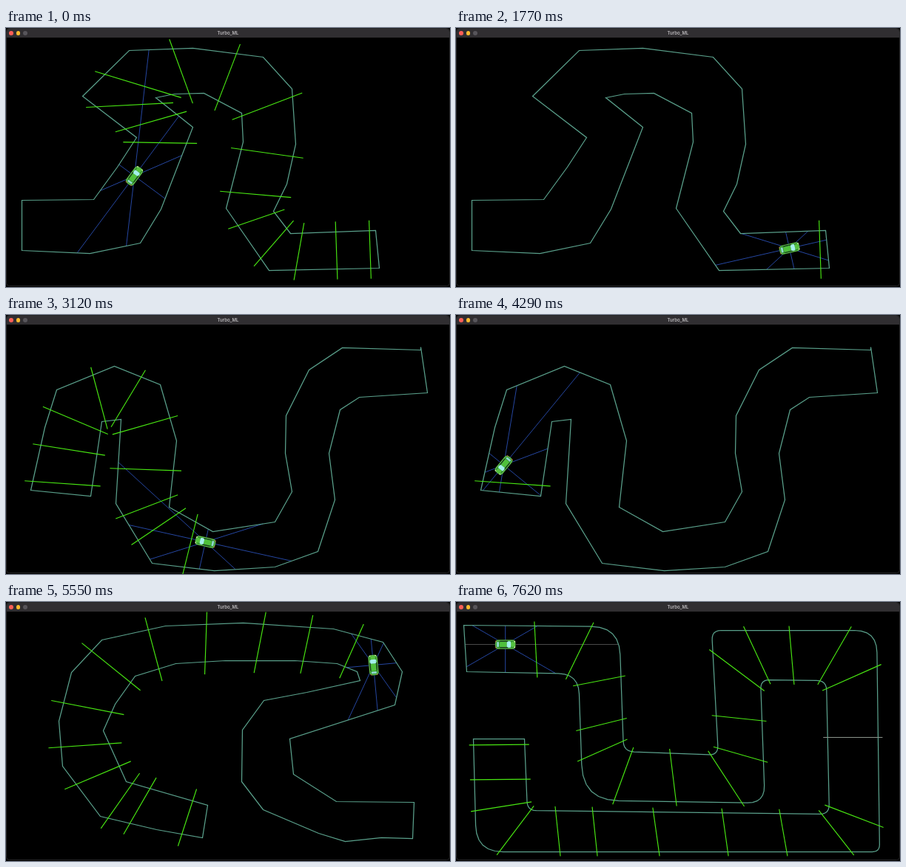
Animation, 600 px wide and 351 px high, one loop 7650 ms. Source, as an HTML page with a canvas:

```html
<!DOCTYPE html>
<html lang="en">
<head>
<meta charset="utf-8">
<title>Turbo_ML</title>
<style>
  html, body { margin: 0; width: 100%; height: 100%; overflow: hidden; background: #000; }
  #stage { position: relative; width: 600px; height: 351px; overflow: hidden; background: #000; }
  canvas { position: absolute; left: 0; top: 0; }
  #bar {
    position: absolute; left: 1px; top: 1px; width: 598px; height: 12px;
    border-radius: 4px 4px 0 0; background: #302e31; color: #b9b7ba;
    font: 600 6px/12px Inter, Roboto, sans-serif; text-align: center;
  }
  #bar i { position: absolute; top: 3.1px; width: 5.8px; height: 5.8px; border-radius: 50%; }
</style>
</head>
<body>
<div id="stage">
  <canvas id="view" width="600" height="351"></canvas>
  <div id="bar">
    <i style="left:3.1px;background:#ff5f57"></i>
    <i style="left:12.7px;background:#febc2e"></i>
    <i style="left:22.3px;background:#57555a"></i>
    Turbo_ML
  </div>
</div>
<script>
const LOOP = 7650, STEP = 30, NOSE = 11, SUB = 12, RAD = Math.PI / 180;
const RAYS = [0, 30, 90, 150, 180, 210, 270, 330];
const g = document.getElementById('view').getContext('2d');

// Walls: corners [x, y, rounding]. Routes: points [x, y, tilt of the gate there, if any].
const wallsA = [[21, 233], [118, 232], [150, 188], [176, 148], [103, 92], [166, 30], [252, 27],
  [347, 39], [386, 82], [391, 157], [379, 211], [361, 248], [384, 278], [499, 274], [504, 325],
  [355, 328], [297, 244], [320, 154], [318, 115], [267, 88], [227, 89], [202, 94], [252, 134],
  [209, 245], [181, 291], [113, 305], [21, 301]];
const routeA = [[152, 229], [173, 200], [206, 155, 1], [204, 124, -16], [165, 104, -3],
  [158, 70, 17], [236, 58, 70], [300, 63, 111], [354, 105, -21], [353, 169, 8], [337, 225, 5],
  [334, 260, -19], [360, 293, -49], [395, 305, -80], [446, 299, 88], [491, 286, 88]];

const wallsB = [[560, 47], [454, 44], [409, 74], [378, 136], [377, 187], [386, 239], [363, 280],
  [279, 293], [220, 260], [230, 170], [208, 94], [146, 69], [68, 101], [52, 152], [33, 237],
  [114, 245], [129, 144], [155, 141], [148, 255], [197, 336], [281, 346], [363, 341], [421, 320],
  [444, 250], [436, 187], [451, 128], [477, 111], [569, 105], [560, 43]];
const routeB = [[515, 76], [487, 78, 87], [459, 82, 64], [428, 109, 39], [408, 156, -4],
  [409, 214, 1], [410, 264, 24], [385, 302, 50], [326, 320, 84], [269, 307], [250, 304, 104],
  [200, 290, -34], [188, 260, -21], [189, 209, 2], [190, 148, -16], [167, 109, 121],
  [124, 107, 75], [90, 141, 23], [85, 182, 9], [64, 203], [50, 226, 4]];

const wallsC = [[551, 271], [446, 270], [388, 233], [383, 185], [525, 139], [535, 94], [509, 54],
  [442, 36], [320, 28], [215, 32], [129, 51], [88, 95], [71, 161], [76, 222], [127, 290],
  [203, 308], [265, 319], [272, 275], [162, 243], [131, 174], [147, 138], [174, 100], [229, 83],
  [296, 79], [390, 79], [447, 83], [474, 94], [478, 106], [406, 122], [348, 133], [319, 173],
  [318, 243], [347, 281], [422, 313], [458, 324], [507, 319], [549, 320]];
const routeC = [[515, 295], [482, 297, 87], [424, 290, 112], [368, 259, 142], [352, 221, -6],
  [351, 183, 7], [368, 158, 49], [415, 147, 78], [471, 131, 74], [498, 110, 5], [496, 85],
  [494, 64], [471, 56, 114], [406, 56, 102], [343, 53, 101], [270, 42, 92], [198, 60, 75],
  [140, 86, 39], [112, 143, 11], [104, 194, -4], [122, 235, -23], [156, 266, -55],
  [181, 275, -60], [245, 290, -72]];

const wallsD = [[10, 31], [220, 33, 38], [226, 202, 14], [354, 207, 13], [345, 38, 13],
  [568, 38, 30], [572, 338, 10], [27, 338, 36], [23, 185], [92, 185], [96, 282, 12],
  [504, 287, 13], [500, 106, 13], [411, 105, 12], [417, 272, 24], [171, 268, 48], [165, 97, 27],
  [14, 94]];
const routeD = [[64, 57], [107, 57, 87], [171, 57, 116], [195, 106, -11], [198, 165, -14],
  [196, 201, -24], [225, 236, 110], [293, 238, 83], [366, 241, 57], [383, 206, 16], [381, 157, 6],
  [379, 92, 37], [406, 71, 65], [453, 72, 85], [510, 74, 120], [534, 102, -24], [536, 183, 0],
  [538, 290, 21], [514, 313, 52], [442, 313, 80], [363, 311, 82], [270, 311, 82], [187, 310, 84],
  [137, 310, 84], [79, 310, -53], [60, 277, -9], [60, 240, -0.5], [58, 193, -0.5]];

const mix = (a, b, u) => a + (b - a) * u;

// Corners with a rounding turn into short curves.
function outline(corners) {
  const n = corners.length;
  return corners.flatMap(([x, y, r], i) => {
    if (!r) return [[x, y]];
    const toward = ([px, py]) => {
      const u = r / Math.hypot(px - x, py - y);
      return [mix(x, px, u), mix(y, py, u)];
    };
    const a = toward(corners[(i + n - 1) % n]), b = toward(corners[(i + 1) % n]);
    return Array.from({ length: 7 }, (_, k) => [x, y].map((c, j) =>
      mix(mix(a[j], c, k / 6), mix(c, b[j], k / 6), k / 6)));
  });
}

// Distance from a point to the nearest wall in a direction.
function reach(sides, x, y, dx, dy) {
  let best = Infinity;
  for (const [[x1, y1], [x2, y2]] of sides) {
    const ex = x2 - x1, ey = y2 - y1, det = dx * ey - dy * ex;
    const u = ((x1 - x) * ey - (y1 - y) * ex) / det;
    const v = ((x1 - x) * dy - (y1 - y) * dx) / det;
    if (u >= 0 && v >= 0 && v <= 1) best = Math.min(best, u);
  }
  return best;
}

const spline = (a, b, c, d, u) =>
  b + u / 2 * (c - a + u * (2 * a - 5 * b + 4 * c - d + u * (3 * (b - c) + d - a)));

// Smooth curve through the points, sampled with the running length.
function sampleRoute(pts) {
  const at = i => pts[Math.max(0, Math.min(pts.length - 1, i))];
  const out = [];
  let s = 0;
  for (let k = 0; k <= (pts.length - 1) * SUB; k++) {
    const i = Math.floor(k / SUB), u = k / SUB - i;
    const [x, y] = [0, 1].map(j => spline(at(i - 1)[j], at(i)[j], at(i + 1)[j], at(i + 2)[j], u));
    if (k) s += Math.hypot(x - out[k - 1].x, y - out[k - 1].y);
    out.push({ x, y, s });
  }
  return out;
}

// A gate spans the road at its tilt and sticks out past both walls.
function makeGate(sides, [x, y, tilt], s, over) {
  const dx = Math.cos(tilt * RAD), dy = Math.sin(tilt * RAD);
  const a = reach(sides, x, y, -dx, -dy) + over, b = reach(sides, x, y, dx, dy) + over;
  return { s, level: tilt === 0, ends: [x - dx * a, y - dy * a, x + dx * b, y + dy * b] };
}

// stops: [time, place on the route in points]; the speed is even between two stops.
function makeTrack(walls, points, over, stops) {
  const pts = outline(walls), route = sampleRoute(points);
  const sides = pts.map((p, i) => [p, pts[(i + 1) % pts.length]]);
  const lengthAt = i => route[Math.round(i * SUB)].s;
  return {
    pts, route, sides,
    end: stops[stops.length - 1][0],
    gates: points.flatMap((p, i) =>
      p.length > 2 ? [makeGate(sides, p, lengthAt(i), over)] : []),
    stops: stops.map(([t, i]) => ({ t, s: lengthAt(i) }))
  };
}

const tracks = [
  makeTrack(wallsA, routeA, 14, [[0, 1], [1770, 14.08], [1860, 14.75]]),
  makeTrack(wallsB, routeB, 11, [[1860, 0], [3120, 9], [4290, 19], [4350, 19.6]]),
  makeTrack(wallsC, routeC, 17, [[4350, 0], [5550, 10], [6540, 15.92], [7590, 22.8]]),
  makeTrack(wallsD, routeD, 6, [[7590, 0], [LOOP, 0.17]])
];

// Index i so that the value lies between entries i - 1 and i.
function bracket(list, key, value) {
  let i = 1;
  while (i < list.length - 1 && list[i][key] < value) i++;
  return i;
}

function travelled({ stops }, t) {
  const i = bracket(stops, 't', t), a = stops[i - 1], b = stops[i];
  return mix(a.s, b.s, (t - a.t) / (b.t - a.t));
}

function pointAt(route, s) {
  const i = bracket(route, 's', s), a = route[i - 1], b = route[i];
  const u = Math.max(0, Math.min(1, (s - a.s) / (b.s - a.s)));
  return { x: mix(a.x, b.x, u), y: mix(a.y, b.y, u) };
}

function line(x1, y1, x2, y2, color, width) {
  g.strokeStyle = color;
  g.lineWidth = width;
  g.beginPath();
  g.moveTo(x1, y1);
  g.lineTo(x2, y2);
  g.stroke();
}

function box(x, y, w, h, r, color) {
  g.fillStyle = color;
  g.beginPath();
  g.roundRect(x, y, w, h, r);
  g.fill();
}

function drawCar(x, y, angle) {
  g.save();
  g.translate(x, y);
  g.rotate(angle);
  box(-14, -6.5, 28, 13, 4.5, '#1f4a1c');
  box(-13.5, -6, 27, 12, 4, '#6fcf55');
  box(-12.5, -5, 25, 10, 3, '#2f8a2c');
  box(7.5, -3.5, 5, 7, 2, '#55c23f');
  box(-8, -3.5, 10, 7, 1.5, '#4fc03c');
  box(2, -4.3, 5.5, 8.6, 1.5, '#a4f0ea');
  box(-11.5, -3.6, 2.8, 7.2, 1, '#8fd9cd');
  for (const side of [-1, 1]) {
    box(-7.5, side * 4.4 - 0.6, 11, 1.2, 0.5, '#16351a');
    box(-13.6, side * 4 - 1, 1.2, 2, 0.5, '#b0553c');
    box(12, side * 3.8 - 1, 1.3, 2, 0.5, '#d9f2b0');
  }
  g.restore();
}

function drawRays(sides, x, y, heading) {
  for (const deg of RAYS) {
    const a = heading + deg * RAD, dx = Math.cos(a), dy = Math.sin(a);
    const far = reach(sides, x, y, dx, dy);
    const color = Math.abs(dy) < 0.01 ? '#4a4a4a' : '#2546a0';
    if (far < Infinity) line(x, y, x + dx * far, y + dy * far, color, 1);
  }
}

function draw(t) {
  const track = tracks.find(k => t < k.end);
  const s = travelled(track, t);
  const { x, y } = pointAt(track.route, s);
  const a = pointAt(track.route, s - 2), b = pointAt(track.route, s + 2);
  const heading = Math.atan2(b.y - a.y, b.x - a.x);

  // Half a pixel over, so that level lines stay sharp.
  g.setTransform(1, 0, 0, 1, 0.5, 0.5);
  g.fillStyle = '#000';
  g.fillRect(-1, -1, 602, 353);
  g.strokeStyle = '#242426';
  g.lineWidth = 1;
  g.beginPath();
  g.roundRect(0, 0, 599, 349, 4);
  g.stroke();

  drawRays(track.sides, x, y, heading);

  g.strokeStyle = '#5aa08b';
  g.lineWidth = 1.25;
  g.beginPath();
  track.pts.forEach(p => g.lineTo(...p));
  g.closePath();
  g.stroke();

  for (const gate of track.gates) {
    if (gate.s > s + NOSE) line(...gate.ends, gate.level ? '#8c948c' : '#48e612', 1.15);
  }
  drawCar(x, y, heading);
}

const start = performance.now();
function tick() {
  const t = Math.max(0, performance.now() - start) % LOOP;
  draw(Math.floor(t / STEP) * STEP);
  requestAnimationFrame(tick);
}
tick();
</script>
</body>
</html>
```
